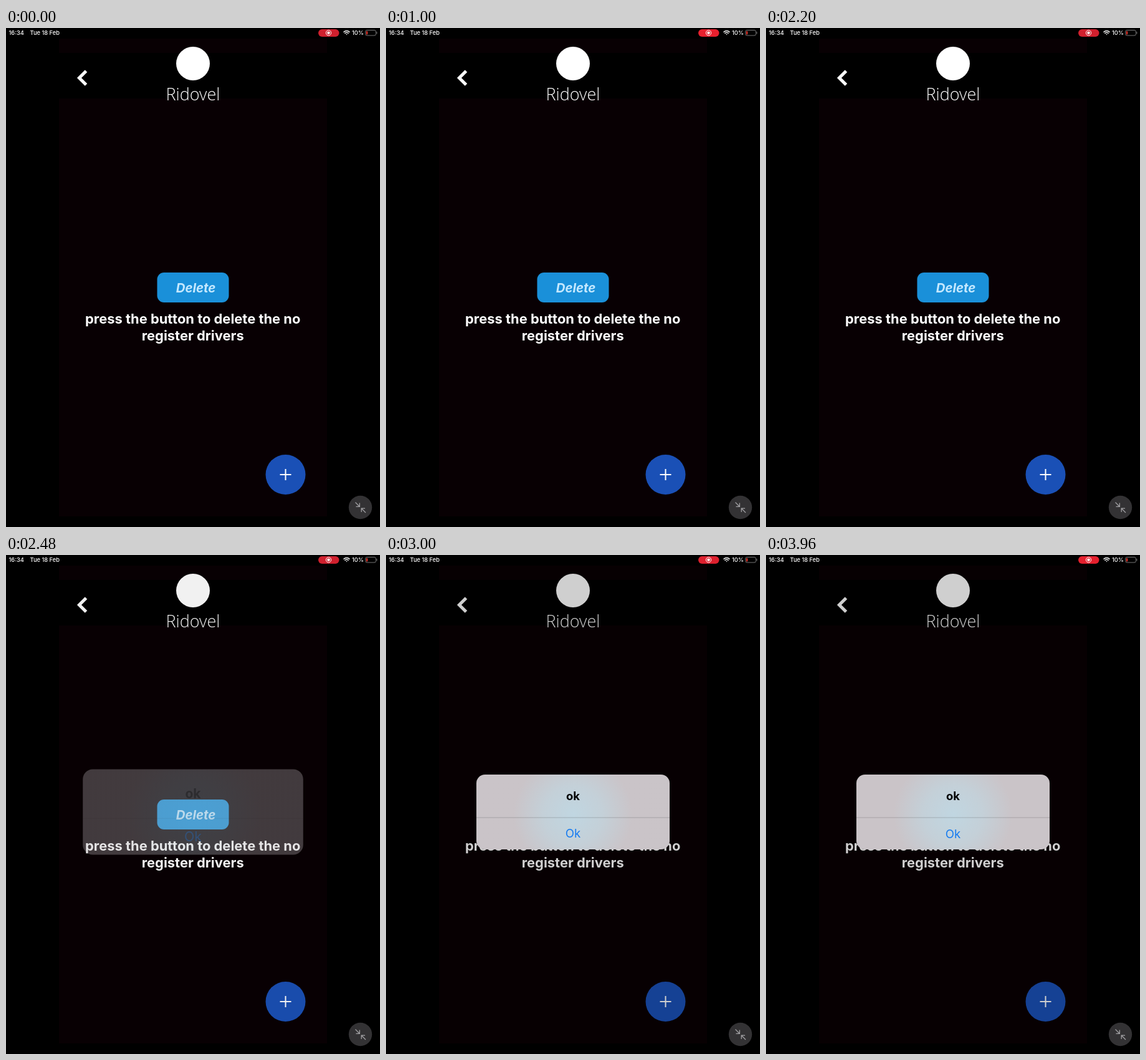
An HTML page that plays this animation: 600 by 800 pixels, repeating every 4 s.

```html
<!DOCTYPE html>
<html lang="en">
<head>
<meta charset="utf-8">
<title>Delete drivers</title>
<style>
  html, body { margin: 0; width: 100%; height: 100%; overflow: hidden; background: #000; }
  svg { display: block; width: 100%; height: 100%; }
  text { font-family: Inter, "Noto Sans", sans-serif; fill: #fff; }
  .mid { text-anchor: middle; }
  .message { font-size: 21.9px; font-weight: 700; }
  .status { font-size: 9.3px; font-weight: 500; }
</style>
</head>
<body>
<svg viewBox="0 0 600 800">
  <defs>
    <radialGradient id="glow" gradientUnits="userSpaceOnUse" cx="300" cy="416" r="95">
      <stop offset="0" stop-color="#c0d6e1"/>
      <stop offset=".5" stop-color="#c4d0d8"/>
      <stop offset="1" stop-color="#cac4c8"/>
    </radialGradient>
  </defs>

  <rect width="600" height="800"/>
  <path d="M85 17H515V40H85ZM85 113H515V783H85Z" fill="#080003"/>

  <!-- header -->
  <path d="M128.500 69L117.500 80L128.500 91" fill="none" stroke="#fff" stroke-width="5"/>
  <circle cx="300" cy="57" r="27" fill="#fff"/>
  <text class="mid" x="300" y="116" style="font:300 27px 'Open Sans',sans-serif">Ridovel</text>

  <!-- content -->
  <rect x="242.500" y="392" width="115" height="48" rx="11" fill="#1a90d9"/>
  <text class="mid" x="304.500" y="423.500" style="font-size:20.4px;font-weight:700;font-style:italic;fill:#c4e8ff">Delete</text>
  <text class="mid message" x="299.700" y="474">press the button to delete the no</text>
  <text class="mid message" x="299.700" y="501">register drivers</text>
  <circle cx="448.500" cy="716" r="32" fill="#1a50b6"/>
  <path d="M439.500 716H457.500M448.500 707V725" stroke="#fff" stroke-width="2"/>

  <rect id="shade" width="600" height="800"/>

  <g id="alert">
    <rect x="145" y="352" width="310" height="120" rx="14" fill="url(#glow)"/>
    <path d="M145 421H455" stroke="rgba(0,0,0,.18)"/>
    <text class="mid" x="300" y="393" style="font-size:18.5px;font-weight:700;fill:#000">ok</text>
    <text class="mid" x="300" y="453.500" style="font-size:18.7px;fill:#167bf0">Ok</text>
  </g>

  <!-- system overlays -->
  <text class="status" x="4.500" y="11">16:34</text>
  <text class="status" x="38.500" y="11">Tue 18 Feb</text>
  <rect id="record" x="501" y="2" width="33.500" height="12" rx="6"/>
  <circle cx="517.500" cy="7.800" r="4.200" fill="none" stroke="#fff"/>
  <circle cx="517.500" cy="7.800" r="2.300" fill="#fff"/>
  <g fill="none" stroke="#fff" stroke-width="1.500">
    <path d="M541.500 6.700Q546.500 2.300 551.500 6.700M543.300 8.700Q546.500 5.900 549.700 8.700"/>
    <path d="M545 9.800H548L546.500 11.300Z" fill="#fff" stroke="none"/>
  </g>
  <text class="status" x="555" y="11">10%</text>
  <rect x="576.500" y="3.500" width="17" height="8.500" rx="2.500" fill="none" stroke="#777"/>
  <rect x="578" y="5" width="2" height="5.500" rx=".8" fill="#f03a30"/>
  <path d="M595 6.300V9.300" stroke="#777"/>

  <circle cx="568.500" cy="768.500" r="18.700" fill="#333234"/>
  <path d="M560.500 760.500L567 767M567.300 761.500V767.300H561.500M577 777L570.500 770.500M570.200 776V770.200H576" fill="none" stroke="#a2a1a4" stroke-width="1.300"/>
</svg>
<script>
  const LOOP = 4000, ALERT_START = 2421, STIFFNESS = 0.0182, PULSE = 2400;
  const byId = id => document.getElementById(id);
  const shade = byId("shade"), alertBox = byId("alert"), record = byId("record");

  function draw(time) {
    // Critically damped spring: 1 before the alert opens, settling to 0.
    const s = Math.max(0, time - ALERT_START) * STIFFNESS;
    const remaining = (1 + s) * Math.exp(-s);
    const shown = 1 - remaining;
    shade.setAttribute("opacity", 0.19 * shown);
    // Each part fades on its own, so the labels tint the panel beneath them.
    for (const part of alertBox.children) part.setAttribute("opacity", shown);
    alertBox.setAttribute("transform",
      `translate(300 412) scale(${1 + 0.2 * remaining}) translate(-300 -412)`);

    const pulse = (1 - Math.cos(2 * Math.PI * time / PULSE)) / 2;
    record.setAttribute("fill", `rgb(${208 + 26 * pulse},32,46)`);
  }

  const start = performance.now();
  function tick() {
    draw((performance.now() - start) % LOOP);
    requestAnimationFrame(tick);
  }
  tick();
</script>
</body>
</html>
```
